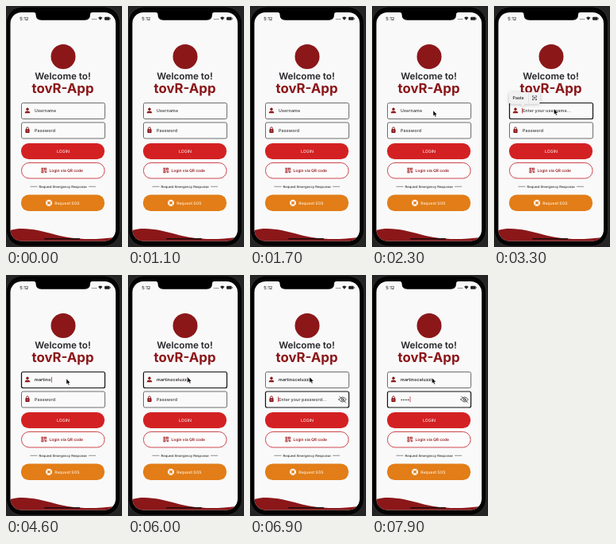
An HTML page that plays this animation: 146x302 px, repeating every 8000 ms.

```html
<!DOCTYPE html>
<html lang="en">
<head>
<meta charset="utf-8">
<title>Login screen</title>
<style>
html, body { margin: 0; width: 100%; height: 100%; overflow: hidden; background: #000; }
svg { display: block; width: 146px; height: 302px; }
text { font-family: Inter, "Open Sans", sans-serif; text-rendering: geometricPrecision; }
.mid { text-anchor: middle; }
.field { fill: #fafafa; stroke: #4a4a4c; stroke-width: .8; }
.field.on { stroke: #111; stroke-width: 1.2; }
.input { font-size: 5.3px; font-weight: 600; letter-spacing: .12px; fill: #4a4a4c; }
.input.typed { fill: #222; }
.caret { fill: #c8232b; }
.dark { fill: #8b1719; }
.line { fill: none; stroke-linecap: round; stroke-linejoin: round; }
</style>
</head>
<body>
<svg viewBox="0 0 146 302">
  <defs>
    <clipPath id="screen"><rect x="5.5" y="8" width="132.5" height="286.5" rx="14"/></clipPath>
    <filter id="soft" x="-30%" y="-50%" width="160%" height="220%">
      <feDropShadow dx="0" dy="1" stdDeviation="2" flood-opacity=".25"/>
    </filter>
  </defs>
  <rect width="146" height="302" fill="#242425"/>
  <rect x=".4" y="1" width="143" height="300" rx="20" fill="#030303" stroke="#38383a" stroke-width=".7"/>

  <g clip-path="url(#screen)">
    <rect x="5" y="7" width="134" height="288" fill="#f9f9fa"/>
    <path class="dark" d="M5 281C22 276 42 281 62 286.5S106 294 139 289.5V295H5Z"/>
    <rect x="48" y="291" width="45" height="1.6" rx=".8" fill="#1c0c0d"/>
  </g>
  <path d="M35 6V8Q37.5 8 37.5 10.5Q37.5 17.7 44.5 17.7H99Q106 17.7 106 10.5Q106 8 108.5 8V6Z"/>

  <!-- status bar -->
  <text x="17.3" y="17.8" font-size="5.7" font-weight="500" fill="#222">5:12</text>
  <g fill="#222">
    <circle cx="108.6" cy="16.6" r=".5"/><circle cx="110.3" cy="16.6" r=".5"/>
    <circle cx="112" cy="16.6" r=".5"/><circle cx="113.7" cy="16.6" r=".5"/>
    <path d="M116 14.8Q118.7 12.4 121.4 14.8L118.7 17.8Z"/>
    <rect x="124" y="13.8" width="6.6" height="4" rx="1"/>
    <rect x="131" y="15" width=".6" height="1.6"/>
  </g>

  <!-- heading -->
  <circle class="dark" cx="72" cy="63.5" r="15.5"/>
  <text class="mid" x="71.5" y="92.3" font-size="11.7" font-weight="600" fill="#242427">Welcome to!</text>
  <text class="mid dark" x="71.5" y="109.3" font-size="16.8" font-weight="700">tovR-App</text>

  <!-- fields -->
  <rect id="userBox" class="field" x="19.5" y="121.5" width="105" height="20" rx="2"/>
  <rect id="passBox" class="field" x="19.5" y="146" width="105" height="20" rx="2"/>
  <g class="dark">
    <circle cx="27" cy="129.3" r="1.7"/>
    <path d="M23.8 134.3V133.4Q24 131.6 27 131.6T30.2 133.4V134.3Z"/>
    <rect x="24.4" y="154.3" width="5.2" height="4.6" rx=".7"/>
  </g>
  <path class="line" d="M25.5 154.5V153.4A1.5 1.5 0 0 1 28.5 153.4V154.5" stroke="#8b1719" stroke-width=".9"/>
  <circle cx="27" cy="156.6" r=".6" fill="#fff"/>
  <text id="user" class="input" x="36" y="133"></text>
  <text id="pass" class="input" x="36" y="157.7"></text>
  <rect id="caret" class="caret" width=".8" height="6.8"/>
  <g id="eye" class="line" stroke="#4b4b4d" stroke-width=".9">
    <path d="M111.8 156Q116.5 149.8 121.2 156Q116.5 162.2 111.8 156Z"/>
    <circle cx="116.5" cy="156" r="1.5"/>
    <path d="M112.5 152L120.5 160"/>
  </g>

  <!-- buttons -->
  <rect x="19" y="172" width="105" height="20" rx="9.5" fill="#d32123"/>
  <text class="mid" x="72" y="184" font-size="5.2" font-weight="400" fill="#fff">LOGIN</text>
  <rect x="19.5" y="196.5" width="104.5" height="19.5" rx="9.5" fill="#fcfcfc" stroke="#c9343a" stroke-width=".9"/>
  <g fill="none" stroke="#a51d22" stroke-width=".9">
    <rect x="44.9" y="203.2" width="2" height="2"/><rect x="48.5" y="203.2" width="2" height="2"/>
    <rect x="44.9" y="206.8" width="2" height="2"/><path d="M48 207H49.4V209.2M50.8 206.5V209"/>
  </g>
  <text x="54.5" y="208" font-size="4.9" font-weight="600" fill="#9b1d21">Login via QR code</text>
  <path d="M30.5 226.3H39.5M104 226.3H113" stroke="#4a4a4c" stroke-width=".6"/>
  <text class="mid" x="71.7" y="227.7" font-size="4.15" font-weight="500" fill="#333">Request Emergency Response</text>
  <rect x="19" y="236.5" width="105" height="20.5" rx="9.5" fill="#e27d17"/>
  <circle cx="54" cy="246.8" r="2.9" fill="none" stroke="#fff" stroke-width="2.2"/>
  <path d="M51 243.8L52.8 245.6M57 243.8L55.2 245.6M51 249.8L52.8 248M57 249.8L55.2 248" stroke="#e27d17" stroke-width=".8"/>
  <text x="61.2" y="248.6" font-size="5" font-weight="600" fill="#fbe2c4">Request SOS</text>

  <!-- paste menu -->
  <g id="menu">
    <path filter="url(#soft)" fill="#f1f1f2" d="M22 108H55Q58 108 58 111V119.5Q58 122.5 55 122.5H39L36.5 125L34 122.5H22Q19 122.5 19 119.5V111Q19 108 22 108Z"/>
    <text x="23.5" y="117.2" font-size="5.3" font-weight="500" fill="#222">Paste</text>
    <path d="M43.5 108V122.5" stroke="#d2d2d4" stroke-width=".5"/>
    <path class="line" stroke="#333" stroke-width=".7" d="M48.5 114V112.7H49.8M52.2 112.7H53.5V114M53.5 116.4V117.7H52.2M49.8 117.7H48.5V116.4M49.8 114.5H52.2M49.8 116H52.2"/>
  </g>

  <path id="pointer" d="M0 0V6.8L1.6 5.4L2.7 7.9L3.9 7.4L2.9 5H5Z" fill="#000" stroke="#fff" stroke-width=".4"/>
</svg>
<script>
const LOOP = 8000;
const NAME = "martinoceluzzi";
const nameKeys = [4000, 4100, 4200, 4300, 4400, 4500, 4600, 4800, 5000, 5200, 5400, 5700, 5900, 6200];
const passKeys = [7300, 7400, 7500, 7700];
const USER_ON = 2900, MENU_ON = 3200, MENU_OFF = 3800, PASS_ON = 6800;
// time, x, y of the pointer tip
const path = [
  [1700, 147, 0], [2250, 77, 131], [2800, 77, 131], [3200, 75.5, 129],
  [4000, 75.5, 129], [4500, 76, 130], [5400, 76, 130], [5900, 75, 128], [6800, 75, 128], [7300, 75.5, 129]
];

const el = id => document.getElementById(id);
const [userBox, passBox, user, pass, caret, eye, menu, pointer] =
  ["userBox", "passBox", "user", "pass", "caret", "eye", "menu", "pointer"].map(el);

const show = (node, on) => node.style.display = on ? "" : "none";
const count = (keys, t) => keys.filter(k => k <= t).length;
const ease = p => p * p * (3 - 2 * p);

function pointerAt(t) {
  const i = path.findIndex(p => p[0] > t);
  if (i < 0) return path[path.length - 1].slice(1);
  const [t0, x0, y0] = path[i - 1], [t1, x1, y1] = path[i];
  const p = ease((t - t0) / (t1 - t0));
  return [x0 + (x1 - x0) * p, y0 + (y1 - y0) * p];
}

function fill(node, typed, hint) {
  const value = typed || hint;
  if (node.textContent !== value) node.textContent = value;
  node.classList.toggle("typed", typed !== "");
}

function draw(t) {
  const onUser = t >= USER_ON && t < PASS_ON, onPass = t >= PASS_ON;
  const name = NAME.slice(0, count(nameKeys, t));
  const dots = "•".repeat(count(passKeys, t));
  userBox.classList.toggle("on", onUser);
  passBox.classList.toggle("on", onPass);
  fill(user, name, onUser ? "Enter your username..." : "Username");
  fill(pass, dots, onPass ? "Enter your password..." : "Password");

  const typed = onPass ? dots : name;
  const node = onPass ? pass : user;
  show(caret, onUser || onPass);
  caret.setAttribute("x", typed ? 36.4 + node.getComputedTextLength() : 35);
  caret.setAttribute("y", onPass ? 152.4 : 127.8);

  show(eye, onPass);
  show(menu, t >= MENU_ON && t < MENU_OFF);
  show(pointer, t >= path[0][0]);
  if (t >= path[0][0]) pointer.setAttribute("transform", `translate(${pointerAt(t)})`);
}

function tick() {
  draw(performance.now() % LOOP);
  requestAnimationFrame(tick);
}
tick();
</script>
</body>
</html>
```
